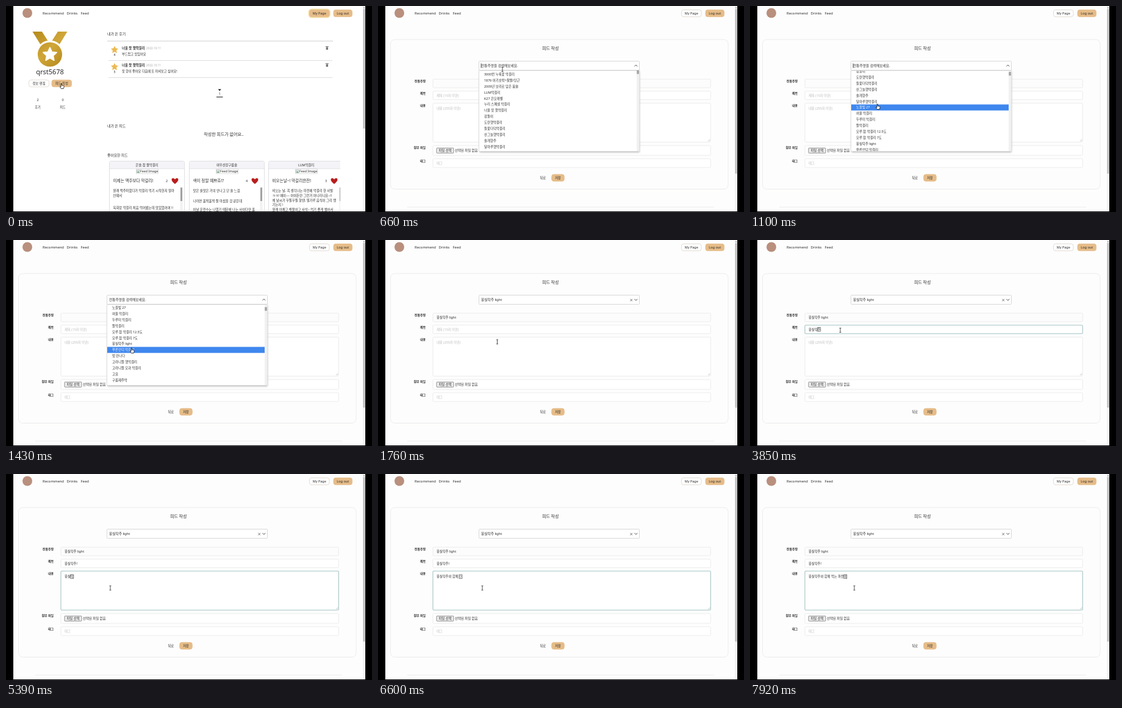
These frames come from a looping animation (600 by 338 pixels, 8000 ms). An HTML page with a canvas:

```html
<!DOCTYPE html>
<html lang="ko">
<head>
<meta charset="utf-8">
<title>피드 작성</title>
<style>
html, body { margin: 0; width: 600px; height: 338px; overflow: hidden; background: #000; }
canvas { display: block; width: 600px; height: 338px; }
</style>
</head>
<body>
<canvas id="stage"></canvas>
<script>
const W = 600, H = 338, LOOP = 8000, STEP = 110;
const FONT = '"Noto Sans", "Noto Sans CJK KR", sans-serif';
const TAN = '#e6bc88', INK = '#2b2b2b', PALE = '#e9e7ea', HINT = '#b9b9b9', FOCUS = '#a5c3c3';
const canvas = document.getElementById('stage');
const g = canvas.getContext('2d');
const dpr = window.devicePixelRatio || 1;
canvas.width = W * dpr;
canvas.height = H * dpr;

// ---------- helpers ----------
// y is the vertical middle of the line
function text(str, x, y, size = 5.4, color = INK, weight = 400, align = 'left') {
  g.font = `${weight} ${size}px ${FONT}`;
  g.fillStyle = color;
  g.textAlign = align;
  g.fillText(str, x, y + size * 0.37);
  return g.measureText(str).width;
}
const center = (str, x, y, size, color, weight) => text(str, x, y, size, color, weight, 'center');

function box(x, y, w, h, r, fill, stroke, line = 0.8) {
  g.beginPath();
  g.roundRect(x, y, w, h, r);
  if (fill) { g.fillStyle = fill; g.fill(); }
  if (stroke) { g.strokeStyle = stroke; g.lineWidth = line; g.stroke(); }
}

function poly(points, fill, stroke, line = 0.8, open = false) {
  g.beginPath();
  points.forEach(([x, y]) => g.lineTo(x, y));
  if (!open) g.closePath();
  if (fill) { g.fillStyle = fill; g.fill(); }
  if (stroke) { g.strokeStyle = stroke; g.lineWidth = line; g.stroke(); }
}

const hline = (x1, x2, y, color, line) => poly([[x1, y], [x2, y]], null, color, line, true);

function star(x, y, r, fill) {
  const pts = [];
  for (let i = 0; i < 10; i++) {
    const a = i * Math.PI / 5 - Math.PI / 2, q = i % 2 ? r * 0.48 : r;
    pts.push([x + q * Math.cos(a), y + q * Math.sin(a)]);
  }
  g.lineJoin = 'round';
  poly(pts, fill, fill, r * 0.16);
  g.lineJoin = 'miter';
}

function button(label, x, y, w, h, filled, size = 5.4) {
  box(x, y, w, h, 3.5, filled ? TAN : '#fff', filled ? TAN : '#ddd3c8');
  center(label, x + w / 2, y + h / 2, size);
}

// ---------- page frame ----------
function shell(pageBg, thumbEnd, myPageActive) {
  g.fillStyle = '#000';
  g.fillRect(0, 0, W, H);
  g.fillStyle = pageBg;
  g.fillRect(12, 0, 577, 337);
  g.fillStyle = '#f3f3f3';
  g.fillRect(585, 0, 4, 337);
  box(585.5, 5, 3, thumbEnd - 5, 0, '#bdbdbd');
  poly([[585.8, 3.4], [588.2, 3.4], [587, 1.6]], '#777');

  g.fillStyle = '#b98f7d';
  g.beginPath();
  g.arc(35, 11.5, 8, 0, 7);
  g.fill();
  text('Recommend', 60, 11.5, 5.9, INK, 500);
  text('Drinks', 99.5, 11.5, 5.9, INK, 500);
  text('Feed', 122.5, 11.5, 5.9, INK, 500);
  if (myPageActive) box(496.5, 5.3, 34.5, 13.4, 4.5, null, '#f3dca0', 1.6);
  button('My Page', 497.5, 6.3, 32.5, 11.4, myPageActive, 5.5);
  button('Log out', 537, 6.3, 30.5, 11.4, true, 5.6);
}

// ---------- profile page ----------
function medal() {
  const gold = g.createLinearGradient(44, 42, 100, 99);
  gold.addColorStop(0, '#b58a1c');
  gold.addColorStop(0.5, '#d0a638');
  gold.addColorStop(1, '#b0851a');
  g.fillStyle = gold;
  for (const side of [-1, 1]) {
    g.beginPath();
    g.moveTo(72 + side * 28.5, 42);
    g.lineTo(72 + side * 13, 42);
    g.lineTo(72 + side * 3.6, 56.8);
    g.quadraticCurveTo(72 + side * 10.5, 58, 72 + side * 15.8, 62.8);
    g.closePath();
    g.fill();
  }
  g.beginPath();
  g.arc(72, 79.5, 20, 0, 7);
  g.fill();
  star(72, 79.8, 11.5, '#fff');
}

function review(y, score, name, body) {
  star(178, y + 3, 5.6, '#ecb950');
  center(score, 178, y + 11.5, 5.2);
  const w = text(name, 190, y, 5.4, INK, 600);
  text('2022.10.11', 192.5 + w, y + 0.3, 4.7, '#a9a9a9');
  text(body, 190, y + 10.5, 5.2);
  box(524.6, y - 1.6, 3.4, 4.4, 0.5, '#777');
  hline(523.8, 528.8, y - 2.4, '#444', 0.8);
  hline(168, 535, y + 20.5, '#c8c8c8', 0.6);
}

function heart(x, y) {
  g.fillStyle = '#b81d1d';
  g.beginPath();
  g.moveTo(x, y + 5);
  g.bezierCurveTo(x - 10, y - 2, x - 4, y - 7.5, x, y - 2.5);
  g.bezierCurveTo(x + 4, y - 7.5, x + 10, y - 2, x, y + 5);
  g.fill();
}

function card(x, drink, title, likes, lines) {
  box(x + 0.5, 254.5, 123, 100, 2, '#fff', '#d9d8de');
  box(x + 0.9, 254.9, 122.2, 12, 0, '#f4f3f7');
  hline(x, x + 124, 267, '#d9d8de', 0.7);
  center(drink, x + 62, 260.7, 5.3, INK, 500);
  box(x + 44.5, 267.6, 36, 7.4, 0, null, '#c4c4c4', 0.6);
  box(x + 45.5, 269, 4.5, 4.5, 0, '#dce9f5', '#8a9a8a', 0.5);
  poly([[x + 45.7, 273.3], [x + 47.8, 271], [x + 49.8, 273.3]], '#6aa45a');
  text('Feed Image', x + 51, 271.2, 5.3);
  text(title, x + 6.5, 287, 6.6, INK, 500);
  center(likes, x + 94.5, 287, 5.4);
  heart(x + 108, 287);
  lines.forEach(([y, s]) => text(s, x + 6.5, y, 5.35));
  g.fillStyle = '#f1f1f1';
  g.fillRect(x + 116.5, 297, 4, 41);
  g.fillStyle = '#a2a2a2';
  g.fillRect(x + 117, 298, 3, 22);
}

function profile() {
  shell('#fff', 201, true);
  medal();
  center('qrst5678', 72, 108, 11);
  button('정보 편집', 37.5, 121.3, 33, 11.4, false);
  button('피드 작성', 75, 121.3, 32.5, 11.4, true);
  center('2', 52, 154, 5.6);
  center('0', 93, 154, 5.6);
  center('후기', 52, 166.5, 5.2);
  center('피드', 93, 166.5, 5.2);

  text('내가 쓴 후기', 166, 45.5, 5.9);
  hline(166, 536, 57.5, '#bdbdbd', 0.7);
  review(69, '4', '너울 잣 햇막걸리', '부드럽고 맛있어요');
  review(97, '5', '너울 잣 햇막걸리', '잣 향이 좋아요 다음에 또 마셔보고 싶어요!');
  poly([[347.6, 136.5], [352.8, 136.5], [350.2, 139.3]], '#111');
  center('1', 350.2, 144, 5.2);
  hline(345, 355.5, 149.3, '#111', 1);

  text('내가 쓴 피드', 166, 197, 5.9);
  center('작성한 피드가 없어요..', 357, 210, 7);
  text('좋아요한 피드', 166, 245, 5.8);
  g.save();
  g.beginPath();
  g.rect(160, 250, 388, 87);
  g.clip();
  card(169, '은솔 참 쌀막걸리', '이제는 맥주보다 막걸리!', '2', [
    [303, '원래 맥주파였다가 막걸리 먹기 시작한지 얼마'], [311, '안돼서'],
    [331, '육회랑 막걸리 처음 먹어봤는데 맛있었어여 !!']]);
  card(300, '여우선장구름술', '색이 정말 예쁘죠!?', '4', [
    [303, '맛은 술맛은 거의 안나고 단 술 느낌'], [320, '나라면 홀짝홀짝 잘 마셨을 것 같은데'],
    [334, '이날 운전수는 나였기 때문에 나는 사이다만 홀']]);
  card(430, 'LUM막걸리', '비오는날~! 막걸리한잔!', '3', [
    [303, '비오는 날, 꼭 생각나는 파전에 막걸리 한 사발'], [311, 'ㅋㅋ! 에이~~ 아이돈만 그런거 아니라니요~!!'],
    [319, '왜 날씨가 꾸질꾸질 할땐, 밀가루 음식이 그리 땡'], [326.5, '기는지 !'],
    [334, '원래 야채고 해물이고 사삭~ 먹기 좋게 썰어서']]);
  g.restore();
}

// ---------- Korean typing ----------
const LEADS = 'ㄱㄲㄴㄷㄸㄹㅁㅂㅃㅅㅆㅇㅈㅉㅊㅋㅌㅍㅎ';
function strokes(str) {
  const out = [];
  let done = '';
  for (const ch of str) {
    const k = ch.charCodeAt(0) - 0xAC00;
    if (k >= 0 && k < 11172) {
      out.push(done + LEADS[Math.floor(k / 588)]);
      if (k % 28) out.push(done + String.fromCharCode(0xAC00 + k - k % 28));
    }
    done += ch;
    out.push(done);
  }
  return out;
}

// runs: [first stroke time, last stroke time, text]
function typed(runs, t) {
  let done = '', now = '';
  for (const [a, b, str] of runs) {
    if (t < a) break;
    const s = strokes(str);
    const i = b > a ? Math.floor((t - a) / (b - a) * (s.length - 1)) : 0;
    now = done + s[Math.min(i, s.length - 1)];
    done += str;
  }
  return now;
}

const DRINK = '몽실탁주 light';
const TITLE = [[3250, 3830, '몽실탁주'], [4060, 4060, '!']];
const BODY = [[4900, 5270, '몽실탁'], [5480, 6150, '주와 함'], [6330, 7140, '께 먹는 파'], [7250, 7480, '전의']];

function entry(str, hint, x, y, focused, idle) {
  if (!str) text(hint, x, y, 5.3, HINT);
  const w = str ? text(str, x, y, 5.3) : 0;
  if (!focused) return;
  const last = str.slice(-1);
  if (last > '\u3130') {
    const cw = g.measureText(last).width;
    box(x + w - cw, y - 3.2, cw + 0.2, 6.4, 0, null, '#333', 0.6);
  } else if (idle % 440 < 220) {
    g.fillStyle = '#111';
    g.fillRect(x + w + 0.1, y - 3.5, 0.7, 7);
  }
}

// ---------- form page ----------
const DRINKS = ['3000번 누룩꽃 막걸리', '1876 아기호박+찰쌀/당근', '2009년 보리로 담은 봄술', 'LUM막걸리', 'K27 은모래별',
  '누리 스페셜 막걸리', '너울 잣 햇막걸리', '감돌이', '도란햇막걸리', '들꽃더덕막걸리', '산그늘햇막걸리', '솔개향주',
  '달마루햇막걸리', '노을빛 27', '여울 막걸리', '두루미 막걸리', '뜰막걸리', '모루 참 막걸리 12.5도',
  '모루 참 막걸리 7도', DRINK, '푸른언덕 막걸리', '벗 만나다', '고라니뜰 햇막걸리', '고라니뜰 모과 막걸리', '고요', '구름재주막'];
const ROW = 9.9, OPEN = 430, PICK = 1640, SCROLL = 13 * ROW + 0.9;
const TITLE_AT = 1980, BODY_AT = 4700;

const clamp = v => Math.max(0, Math.min(1, v));
const ease = v => v * v * (3 - 2 * v);
const isOpen = t => t >= OPEN && t < PICK;

function menu(t, cur) {
  const scroll = SCROLL * ease(clamp((t - 930) / 310));
  g.save();
  g.shadowColor = 'rgba(0,0,0,.3)';
  g.shadowBlur = 3 * dpr;
  g.shadowOffsetY = dpr;
  box(165.5, 106, 263, 132.5, 0, '#fff');
  g.restore();
  box(165.5, 106, 263, 132.5, 0, null, '#d2d2d2', 0.6);
  g.save();
  g.beginPath();
  g.rect(166, 106.4, 258, 131.6);
  g.clip();
  const top = 107 - scroll;
  const hover = cur.y > 106.5 ? Math.floor((cur.y - top) / ROW) : -1;
  DRINKS.forEach((name, i) => {
    const y = top + i * ROW;
    if (i === hover) {
      g.fillStyle = '#3f87ee';
      g.fillRect(166, y, 258, ROW);
    }
    text(name, 174, y + ROW / 2, 5.4, i === hover ? '#fff' : INK);
  });
  g.restore();
  g.fillStyle = '#f1f1f1';
  g.fillRect(424, 106.4, 4.2, 131.6);
  g.fillStyle = '#a3a3a3';
  g.fillRect(424.3, 105.5 + scroll * 0.036, 3.5, 6);
}

function form(t, cur) {
  shell('#fdfdfd', 275, false);
  hline(48, 551, 330, '#e6e6e6', 0.8);
  box(20.5, 55, 553.5, 245.5, 7, '#fdfdfd', PALE);
  center('피드 작성', 282.7, 69.5, 6.9, INK, 500);

  const picked = t >= PICK, open = isOpen(t);
  const inTitle = t >= TITLE_AT && t < BODY_AT, inBody = t >= BODY_AT;
  box(165.5, 90.5, 263, 15, 1, '#fff', '#cfcfcf');
  text(picked ? DRINK : '전통주명을 검색해보세요.', 169, 98, 5.7);
  if (open && (t - 600) % 440 < 220) {
    g.fillStyle = '#111';
    g.fillRect(168.7, 94.3, 0.7, 7.4);
  }
  const d = open ? -1 : 1;
  poly([[420.4, 98 - 1.2 * d], [422.8, 98 + 1.3 * d], [425.2, 98 - 1.2 * d]], null, '#555', 1, true);
  if (picked) {
    poly([[413.4, 96.8], [417, 100.4]], null, '#555', 0.8, true);
    poly([[417, 96.8], [413.4, 100.4]], null, '#555', 0.8, true);
  }

  [['전통주명', 123], ['제목', 142.7], ['내용', 162.7], ['첨부 파일', 232], ['태그', 254]]
    .forEach(([s, y]) => text(s, 78.2, y, 5, INK, 700, 'right'));
  [[120, 14], [139.7, 14], [159.3, 64], [229, 16], [250.7, 14.3]].forEach(([y, h], i) => {
    const on = i === 1 && inTitle || i === 2 && inBody;
    box(90, y, 455.3, h, 1.5, i ? '#fff' : '#fcfcfc', on ? FOCUS : PALE, on ? 1.1 : 0.8);
  });
  if (picked) text(DRINK, 96, 127, 5.3);

  const title = typed(TITLE, t);
  entry(title, '제목 (15자 미만)', 96, 146.7, inTitle, t - (t > 4060 ? 4060 : TITLE_AT));
  let body = typed(BODY, t);
  if (t >= 7590 && t < 7810) body += 'ㅇ';
  entry(body, '내용 (255자 미만)', 96, 168.3, inBody, t - BODY_AT);
  poly([[541, 222], [544.3, 218.7]], null, '#999', 0.5, true);
  poly([[543, 222], [544.3, 220.7]], null, '#999', 0.5, true);

  box(96, 233, 28, 8.3, 0.8, '#efefef', '#777', 0.8);
  center('파일 선택', 110, 237.1, 5.4);
  text('선택된 파일 없음', 126, 237.1, 5.4);
  text('태그', 96, 258, 5.3, HINT);
  center('뒤로', 270.3, 281.7, 5.3);
  button('저장', 284.7, 276.3, 20.6, 11.2, true, 5.3);
  if (open) menu(t, cur);
}

// ---------- pointer ----------
const PATH = [[0, 92, 131], [200, 92, 131], [430, 204, 104], [700, 204, 104], [900, 210, 165], [1240, 210, 165],
  [1400, 207, 181], [1500, 207, 181], [1600, 205, 171], [1690, 205, 171], [1960, 148, 148],
  [4400, 148, 148], [4630, 171, 187], [LOOP, 171, 187]];

function pointer(t) {
  const i = PATH.findIndex(p => p[0] > t);
  const [t0, x0, y0] = PATH[i - 1], [t1, x1, y1] = PATH[i];
  const k = ease((t - t0) / (t1 - t0));
  return { x: x0 + (x1 - x0) * k, y: y0 + (y1 - y0) * k };
}

function drawPointer({ x, y }, kind) {
  g.save();
  g.translate(x, y);
  if (kind === 'beam') {
    poly([[0, -3.5], [0, 3.5]], null, '#222', 0.8, true);
    hline(-1.5, 1.5, -3.5, '#222', 0.7);
    hline(-1.5, 1.5, 3.5, '#222', 0.7);
  } else if (kind === 'hand') {
    poly([[-1.8, -4], [-0.6, -4], [-0.5, -1], [2.6, -0.2], [3.2, 0.6], [2.9, 2.8], [2.2, 4.6],
      [-1.6, 4.6], [-3.6, 1.6], [-3.2, 0.7], [-1.9, 1.6]], '#fff', '#111', 0.8);
  } else {
    poly([[0, 0], [0, 8], [1.9, 6.3], [3.1, 9], [4.3, 8.4], [3.1, 5.8], [5.6, 5.6]], '#fff', '#111', 0.7);
  }
  g.restore();
}

function pointerKind(t, { x, y }) {
  if (t < 220 || isOpen(t) && y > 106.5) return 'hand';
  const inSelect = x > 165 && y > 90 && y < 106;
  const inField = x > 90 && (y > 139 && y < 154 || y > 159 && y < 223);
  return inSelect || inField ? 'beam' : 'arrow';
}

// ---------- loop ----------
function draw(t) {
  g.setTransform(dpr, 0, 0, dpr, 0, 0);
  const cur = pointer(t);
  if (t < 220) profile();
  else form(t, cur);
  drawPointer(cur, pointerKind(t, cur));
}

const start = performance.now();
function tick() {
  const t = (performance.now() - start) % LOOP;
  draw(Math.floor(t / STEP) * STEP);
  requestAnimationFrame(tick);
}
tick();
</script>
</body>
</html>
```
